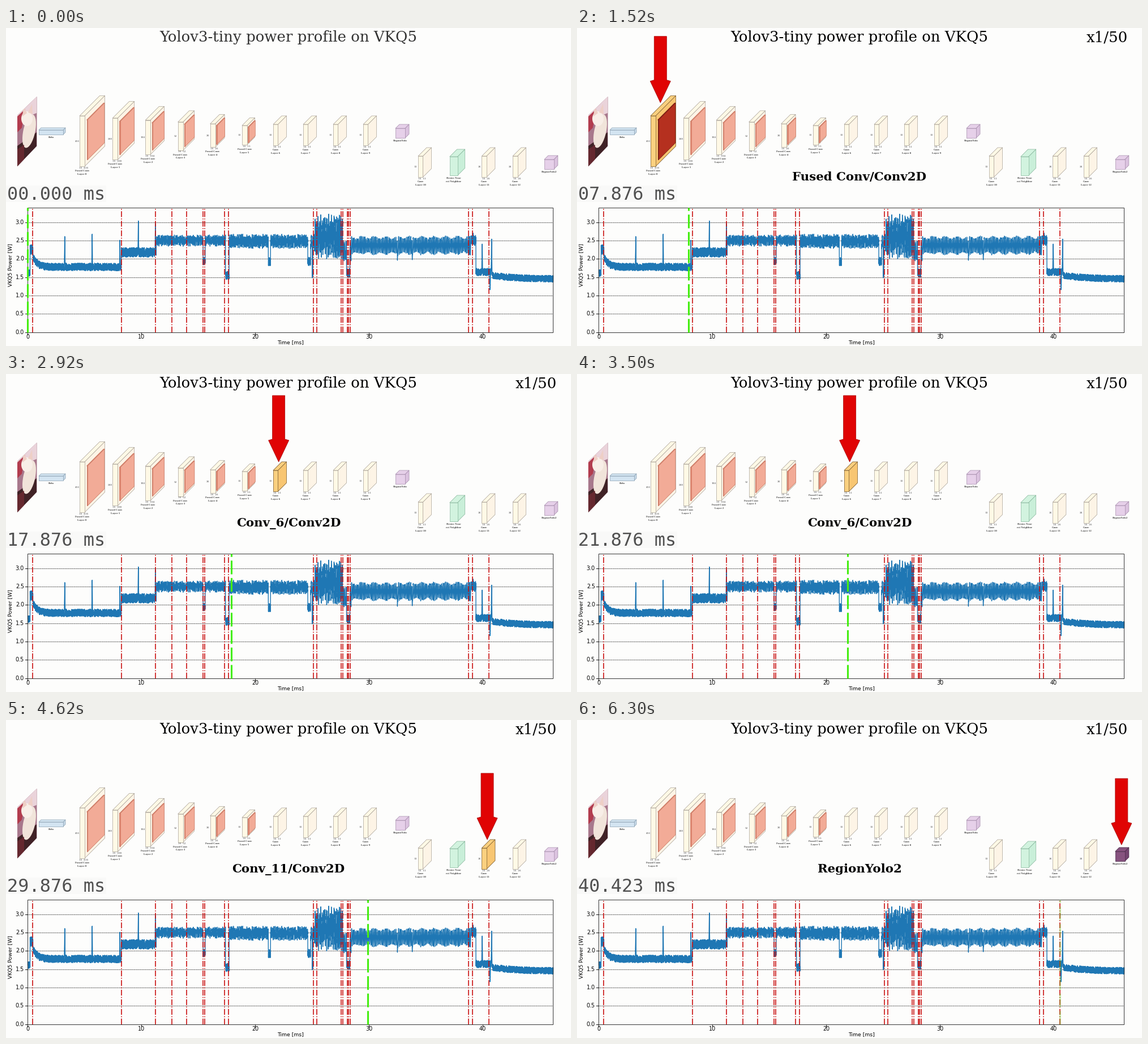
Write a matplotlib script that moves like this. It is 998 px wide and 561 px high and loops after 6320 ms.

```python
from collections import namedtuple

import matplotlib.pyplot as plt
import numpy as np
from matplotlib.animation import FuncAnimation
from matplotlib.patches import Ellipse, Polygon, Rectangle

W, H, DPI = 998, 561, 64
PT = 72 / DPI  # points per pixel
LOOP, STEP = 6320, 20
END = 40.423
SERIF, SANS, MONO = "DejaVu Serif", "DejaVu Sans", "DejaVu Sans Mono"

# Plot area in pixels
LEFT, RIGHT, TOP, BASE = 38.5, 966.5, 316.5, 536.5
X_MS, Y_W = 20.09, 64.6

# Start of each layer and the other marks, in device ms
STARTS = [0, .42, 8.22, 11.22, 12.65, 13.95, 15.42, 17.65, 25.1, 25.42,
          27.54, 27.7, 28.12, 28.22, 28.34, 38.74, 39.09]
MARKS = STARTS[1:] + [15.57, 17.31, 40.55]

# front, side, edge colours: idle and active
CREAM = ("#fff9e6", "#fdf4e6", "#a8a196")
AMBER = ("#fad07f", "#f8c672", "#806030")
COLORS = {
    "relu": (("#d3e4f1", "#c6d9e8", "#8aa0b2"), ("#7fb2dc", "#6a9fca", "#3f6787")),
    "fused": (CREAM, AMBER),
    "conv": (CREAM, AMBER),
    "region": (("#e6d0e9", "#dbc2df", "#a58cab"), ("#87537f", "#754570", "#4a2a48")),
    "resize": (("#d2f3df", "#c9efd9", "#86b69b"), ("#6fd39b", "#5fc38b", "#2f7a52")),
}
INNER = (("#e58a72", "#f2ab97", "#c8745f"), ("#9a2318", "#b5301f", "#701510"))

Layer = namedtuple("Layer", "kind title caption side x y w h d")


def fused(k):
    h = 89 * .825 ** k
    return Layer("fused", "Fused Conv/Conv2D", f"Fused Conv\nLayer {k}", str(416 >> k),
                 130 + 58.6 * k - .24 * k * k, 155 + 4 * k - .12 * k * k, 9, h, .4 * h)


def conv(n, x, y, side=13):
    return Layer("conv", f"Conv_{n}/Conv2D", f"Conv\nLayer {n}", str(side), x, y, 8.5, 37, 15)


def region(name, x, y):
    return Layer("region", name, name, "", x, y, 17, 17, 7)


def build_layers():
    slot = [728 + 55.7 * k for k in range(5)]
    resize = Layer("resize", "ResizeNearestNeighbor", "Resize Near\nest Neighbor", "",
                   slot[1], 227, 14, 33, 13)
    return ([Layer("relu", "Relu", "Relu", "", 58, 180, 43, 8, 4)]
            + [fused(k) for k in range(6)]
            + [conv(6 + k, 472 + 53 * k, 170) for k in range(4)]
            + [region("RegionYolo", 688, 177), conv(10, slot[0], 226), resize,
               conv(11, slot[2] + 1, 226, 26), conv(12, slot[3], 226, 26),
               region("RegionYolo2", slot[4], 232)])


LAYERS = build_layers()

# Power plateaus: start, mean watts, half swing
PLATEAUS = [(0, 1.6, .11), (.2, 2.25, .15), (.45, 1.78, .11), (8.22, 2.18, .14),
            (11.28, 2.5, .15), (17.7, 2.48, .19), (25.2, 2.6, .6), (27.7, 2.2, .3),
            (28.45, 2.37, .24), (38.95, 2.5, .15), (39.4, 1.64, .11), (40.85, 1.45, .1)]
# Short drops: centre, width, watts
DIPS = [(15.5, .18, 1.95), (17.54, .32, 1.55), (21.24, .2, 1.93), (24.74, .24, 1.93),
        (25.03, .06, 1.6), (28.17, .3, 1.62)]
PEAKS = [(3.25, 2.65), (5.66, 2.68), (8.1, 2.56), (9.72, 3.05), (11.22, 3.0),
         (32.5, 1.96), (33.8, 1.97), (39.15, 2.72), (39.95, 2.42), (40.65, 1.15), (40.78, 2.6)]


def sx(t):
    return LEFT + X_MS * t


def sy(watt):
    return BASE - Y_W * watt


def stage(fig):
    ax = fig.add_axes([0, 0, 1, 1])
    ax.set(xlim=(0, W), ylim=(H, 0))
    ax.axis("off")
    return ax


def write(ax, x, y, s, px, font=SERIF, **kw):
    return ax.text(x, y, s, fontsize=px * PT, fontfamily=font, **kw)


def slab(ax, x, y, w, h, d, colors):
    front, side, edge = colors
    faces = [
        ([(x, y), (x + d, y - d), (x + w + d, y - d), (x + w, y)], front),
        ([(x + w, y), (x + w + d, y - d), (x + w + d, y + h - d), (x + w, y + h)], side),
        ([(x, y), (x + w, y), (x + w, y + h), (x, y + h)], front),
    ]
    return [ax.add_patch(Polygon(p, fc=c, ec=edge, lw=.7 * PT, joinstyle="round"))
            for p, c in faces]


def block(ax, layer, active):
    x, y, w, h, d = layer[4:]
    parts = slab(ax, x, y, w, h, d, COLORS[layer.kind][active])
    if layer.kind == "fused":
        parts += slab(ax, x + w + .1 * d, y + .08 * h, 1.5, .79 * h, .84 * d, INNER[active])
    return parts


def note(ax, layer):
    """Tiny size and name texts around a block."""
    tiny = dict(ha="center", va="center", color="#444444")
    cx, low = layer.x + layer.w / 2, layer.y + layer.h
    if layer.side:
        write(ax, layer.x - 4.5, layer.y + layer.h / 2, layer.side, 4.2, **tiny)
        write(ax, cx + 3, low + 2.5, "16  " + layer.side, 4.2, **tiny)
        low += 3
    for i, row in enumerate(layer.caption.split("\n")):
        write(ax, cx, low + 5 + 5.5 * i, row, 5, "Liberation Serif", weight="bold", **tiny)


def photo(ax):
    frame = Polygon([(20, 154), (54.5, 121), (54.5, 208), (20, 244)], fc="#a8788c", ec="none")
    ax.add_patch(frame)
    shapes = [
        Polygon([(20, 154), (54, 121), (54, 150), (20, 164)], fc="#ead3da"),
        Polygon([(20, 156), (34, 143), (28, 176), (20, 184)], fc="#b23c4e"),
        Polygon([(20, 208), (54, 184), (54, 210), (20, 246)], fc="#402226"),
        Ellipse((41, 182), 21, 60, angle=12, fc="#f1e4da"),
        Ellipse((37, 160), 20, 26, fc="#f8eee7"),
        Polygon([(29, 156), (31, 139), (37, 150)], fc="#eecfc6"),
        Polygon([(39, 149), (46, 134), (47, 152)], fc="#eecfc6"),
        Polygon([(20, 214), (32, 206), (32, 234), (20, 246)], fc="#65282f"),
    ]
    for s in shapes:
        s.set_edgecolor("none")
        ax.add_patch(s)
        s.set_clip_path(frame)


def power_curve():
    rng = np.random.default_rng(4)
    t = np.linspace(0, 46.2, 8000)
    starts, mean, swing = np.array(PLATEAUS).T
    i = np.searchsorted(starts, t, side="right") - 1
    noise = rng.uniform(-1, 1, t.size)
    hum = np.sin(2 * np.pi * t / .118)
    beat = .86 + .14 * np.cos(2 * np.pi * t / 1.05)
    calm = (t < 11.2) | (t > 39)
    steady = (t > 28.45) & (t < 38.95)
    wave = np.where(calm, .95 * noise, .6 * hum + .45 * noise)
    wave = np.where(steady, beat * hum + .12 * noise, wave)
    p = mean[i] + swing[i] * wave
    # Settling after the start and after the last layer
    p += np.where(i == 2, .3 * np.exp(-(t - .45) / .35), 0)
    p += np.where(t > 40.85, .1 * np.exp(-(t - 40.85) / 2), 0)
    for at, width, level in DIPS:
        p = np.where(abs(t - at) < width / 2, level + .12 * noise, p)
    for at, peak in PEAKS:
        p += (peak - p) * np.clip(1 - abs(t - at) / .04, 0, 1)
    return t, p


def chart(ax):
    for k in range(7):
        y = sy(k / 2)
        if k:
            ax.plot([LEFT, RIGHT], [y, y], color="#222222", lw=.8 * PT, ls=(0, (2.2, 1.2)))
        ax.plot([LEFT - 4, LEFT], [y, y], color="black", lw=.9 * PT)
        write(ax, 32, y, f"{k / 2:.1f}", 9.6, SANS, ha="right", va="center")
    for t in range(0, 41, 10):
        ax.plot([sx(t)] * 2, [BASE, BASE + 4], color="black", lw=.9 * PT)
        write(ax, sx(t), 545, str(t), 9.6, SANS, ha="center", va="center")
    t, p = power_curve()
    ax.plot(sx(t), sy(p), color="#1f77b4", lw=1.4 * PT, zorder=3)
    for m in MARKS:
        ax.plot([sx(m)] * 2, [BASE, TOP], color="#c80a0a", lw=1.6 * PT, ls="-.", zorder=4)
    ax.add_patch(Rectangle((LEFT, TOP), RIGHT - LEFT, BASE - TOP, fill=False,
                           ec="#222222", lw=.9 * PT, zorder=5))
    write(ax, 502, 555, "Time [ms]", 9.2, SANS, ha="center", va="center")
    write(ax, 8.5, 418.5, "VKQ5 Power [W]", 9.2, SANS, ha="center", va="center", rotation=90)


def scenery(fig):
    """Draw everything that never moves and return it as an image."""
    ax = stage(fig)
    ax.add_patch(Rectangle((0, 278), 177, 29, fc="#f9f9f8", ec="none"))
    photo(ax)
    for layer in LAYERS:
        block(ax, layer, 0)
        note(ax, layer)
    chart(ax)
    fig.canvas.draw()
    image = np.array(fig.canvas.buffer_rgba())
    fig.clear()
    return image


def clock(ms):
    """Device time: fifteen steps of a third of a ms, then a short rest."""
    turn, u = divmod(ms - 680, 700)
    n = 15 * turn + int(min(u, 600) * 15 / 700 + .2)
    return min(max(1.876 + n / 3, 0), END)


def arrow_shape(layer):
    x = layer.x + layer.w / 2 + .36 * layer.d
    y = layer.y - 9 - .4 * layer.d
    half = [(11, -117), (11, -40), (18, -38)]
    return ([(x + a, y + b) for a, b in half] + [(x, y)]
            + [(x - a, y + b) for a, b in half[::-1]])


fig = plt.figure(figsize=(W / DPI, H / DPI), dpi=DPI, facecolor="#fdfdfc")
fig.figimage(scenery(fig), zorder=-1)
ax = stage(fig)
lit = [block(ax, layer, 1) for layer in LAYERS]
arrow = ax.add_patch(Polygon(arrow_shape(LAYERS[0]), fc="#e00404", ec="#a80808", lw=.8 * PT))
cursor, = ax.plot([LEFT] * 2, [BASE, TOP], color="#44ee10", lw=3.1 * PT,
                  ls=(0, (7.8, 2.1)), zorder=6)
title = write(ax, 271, 24, "Yolov3-tiny power profile on VKQ5", 26)
speed = write(ax, 899.5, 24, "x1/50", 26)
label = write(ax, 499, 269, "", 21.3, weight="bold", ha="center")
counter = write(ax, 2, 303, "", 31.9, MONO, color="#505050")


def update(i):
    ms = i * STEP
    t = clock(ms)
    now = int(np.searchsorted(STARTS, t)) - 1  # -1 before the run begins
    for k, parts in enumerate(lit):
        for part in parts:
            part.set_visible(k == now)
    arrow.set_visible(now >= 0)
    label.set_text(LAYERS[now].title if now >= 0 else "")
    arrow.set_xy(arrow_shape(LAYERS[now]))
    fade = min(ms / 400, 1)
    title.set_color(str(.2 * (1 - fade)))
    speed.set_alpha(fade)
    counter.set_text(f"{t:06.3f} ms")
    done = ms >= 6280
    cursor.set_xdata([sx(MARKS[-1] if done else t)] * 2)
    cursor.set_alpha(.25 if done else 1)
    return [arrow, cursor, title, speed, label, counter]


anim = FuncAnimation(fig, update, frames=LOOP // STEP, interval=STEP,
                     repeat=True, repeat_delay=0, blit=False)
plt.show()
```
